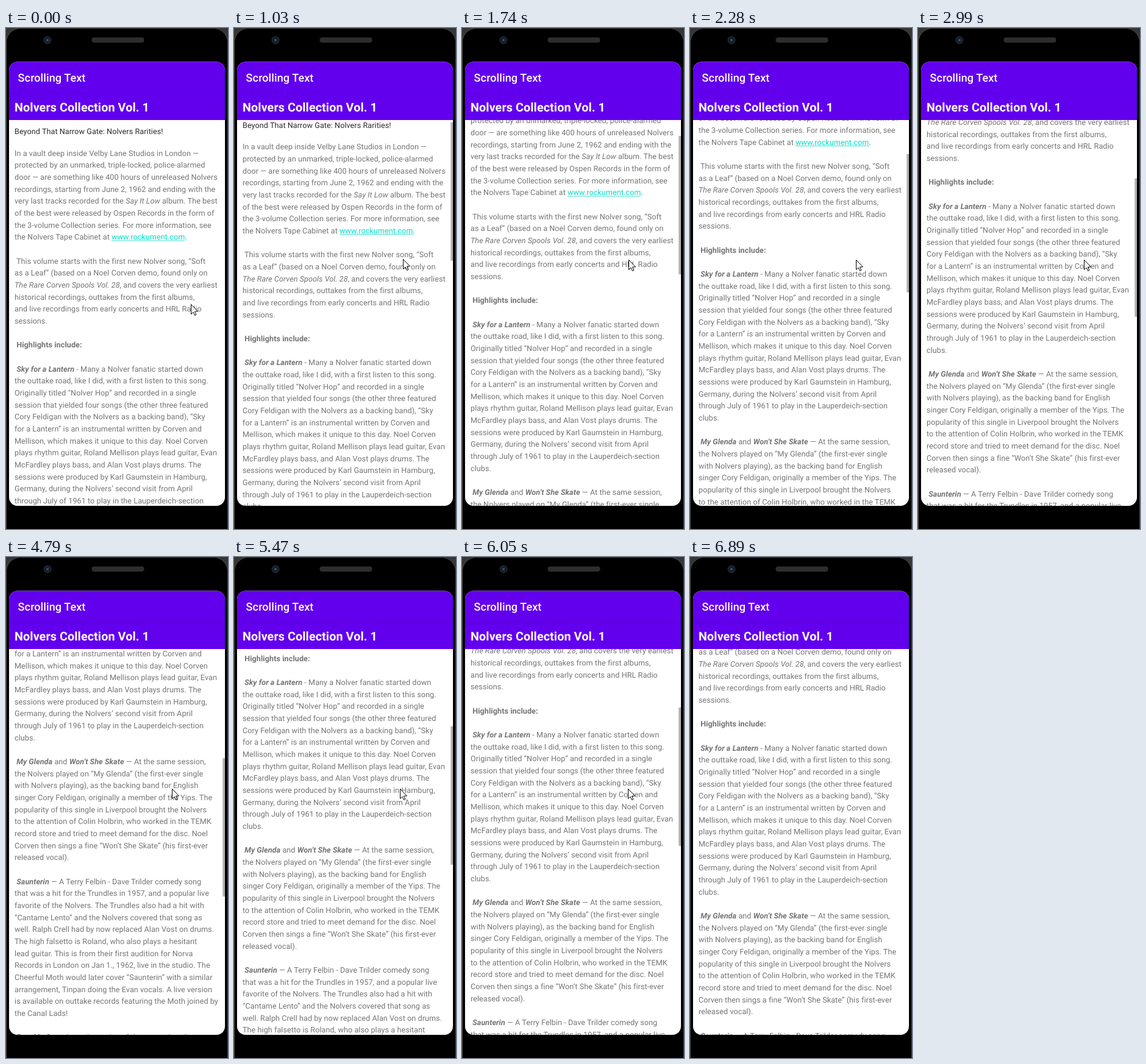
Recreate the animation shown at these times as an HTML page with a canvas. Size 364 px wide and 822 px high, loop 7.6 s.

```html
<!DOCTYPE html>
<html lang="en">
<head>
<meta charset="utf-8">
<title>Scrolling Text</title>
<style>
html, body { margin: 0; width: 100%; height: 100%; overflow: hidden; background: #000; }
canvas { display: block; width: 364px; height: 822px; }
</style>
</head>
<body>
<canvas id="stage"></canvas>
<script>
const W = 364, H = 822, LOOP = 7600;
const TICK = 137, LEAD = 45;
const VIEW = { x: 5, top: 151, right: 359, bottom: 784 };
const PITCH = 19.667, FIRST = 209.6, CONTENT = 1765;
const FAMILY = 'Roboto, "Liberation Sans", sans-serif';

// Marks: ^bold^  *bold italic*  _italic_  ~link~
const article = `In a vault deep inside Velby Lane Studios in London —
protected by an unmarked, triple-locked, police-alarmed
door — are something like 400 hours of unreleased Nolvers
recordings, starting from June 2, 1962 and ending with the
very last tracks recorded for the _Say It Low_ album. The best
of the best were released by Ospen Records in the form of
the 3-volume Collection series. For more information, see
the Nolvers Tape Cabinet at ~www.rockument.com~.

 This volume starts with the first new Nolver song, “Soft
as a Leaf” (based on a Noel Corven demo, found only on
_The Rare Corven Spools Vol. 28_, and covers the very earliest
historical recordings, outtakes from the first albums,
and live recordings from early concerts and HRL Radio
sessions.

 ^Highlights include:^

 *Sky for a Lantern* - Many a Nolver fanatic started down
the outtake road, like I did, with a first listen to this song.
Originally titled “Nolver Hop” and recorded in a single
session that yielded four songs (the other three featured
Cory Feldigan with the Nolvers as a backing band), “Sky
for a Lantern” is an instrumental written by Corven and
Mellison, which makes it unique to this day. Noel Corven
plays rhythm guitar, Roland Mellison plays lead guitar, Evan
McFardley plays bass, and Alan Vost plays drums. The
sessions were produced by Karl Gaumstein in Hamburg,
Germany, during the Nolvers’ second visit from April
through July of 1961 to play in the Lauperdeich-section
clubs.

 *My Glenda* and *Won’t She Skate* — At the same session,
the Nolvers played on “My Glenda” (the first-ever single
with Nolvers playing), as the backing band for English
singer Cory Feldigan, originally a member of the Yips. The
popularity of this single in Liverpool brought the Nolvers
to the attention of Colin Holbrin, who worked in the TEMK
record store and tried to meet demand for the disc. Noel
Corven then sings a fine “Won’t She Skate” (his first-ever
released vocal).

 *Saunterin* — A Terry Felbin - Dave Trilder comedy song
that was a hit for the Trundles in 1957, and a popular live
favorite of the Nolvers. The Trundles also had a hit with
“Cantame Lento” and the Nolvers covered that song as
well. Ralph Crell had by now replaced Alan Vost on drums.
The high falsetto is Roland, who also plays a hesitant
lead guitar. This is from their first audition for Norva
Records in London on Jan 1., 1962, live in the studio. The
Cheerful Moth would later cover “Saunterin” with a similar
arrangement, Tinpan doing the Evan vocals. A live version
is available on outtake records featuring the Moth joined by
the Canal Lads!

 *Row Me On* — An early version of the song, played a
bit slower and with more of a blues feeling, and a cool
bossa-nova beat in middle. Evan had to sing while Noel
played harmonica — a first for the group. Alan Vost played
drums on this version.

 *She Hums Low – Ere Noon Was Due – Swirl and Stomp* —
Live at the Duchess Nerys Theatre by Tollinger Square in
London, attended by the Queen. “Ere Noon Was Due” (by
Rosalind Farnby) is from the musical The Barley King and
a hit for Patsy Roe in 1961. Before playing it, Evan said
it was recorded by his favorite American group, “Bessie
Holker” (which got some laughs). At the end, Noel tells the
people in the cheaper seats to clap their hands, and the`.split('\n');

// Key points [tick, value], joined by straight lines
const scrollPath = [
  [6, 0], [13, 73], [19, 238], [21, 238], [22, 267], [29, 766],
  [31, 766], [35, 499], [40, 353.5], [45, 246]
];
const cursorX = [[0, 303], [2, 280], [13, 272.5], [48, 272], [49, 227]];
const cursorY = [[0, 453], [2, 378], [13, 380], [46, 380], [49, 801]];
const barFade = [[6, 0], [7, 1], [46, 1], [49, 0]];
const CURSOR_GONE = 50;

const styles = { '^': 'bold', '*': 'italic bold', '_': 'italic', '~': '' };
const canvas = document.getElementById('stage');
const ctx = canvas.getContext('2d');
const ratio = window.devicePixelRatio || 1;
canvas.width = W * ratio;
canvas.height = H * ratio;

function along(path, t) {
  const next = path.findIndex(key => key[0] > t);
  if (next === 0) return path[0][1];
  if (next < 0) return path[path.length - 1][1];
  const [t0, v0] = path[next - 1], [t1, v1] = path[next];
  return v0 + (v1 - v0) * (t - t0) / (t1 - t0);
}

function box(x, y, w, h, r) {
  ctx.beginPath();
  ctx.roundRect(x, y, w, h, r);
}

function disc(x, y, r, color) {
  ctx.fillStyle = color;
  ctx.beginPath();
  ctx.arc(x, y, r, 0, Math.PI * 2);
  ctx.fill();
}

function label(text, x, y, size, weight, color) {
  ctx.font = `${weight} ${size}px ${FAMILY}`;
  ctx.fillStyle = color;
  ctx.fillText(text, x, y);
  return ctx.measureText(text).width;
}

function richLine(line, x, y) {
  let mark = '';
  for (const part of line.split(/([\^*_~])/)) {
    if (part in styles) {
      mark = mark ? '' : part;
    } else if (part) {
      const link = mark === '~';
      const width = label(part, x, y, 12.62, styles[mark] || '', link ? '#03dac5' : '#757575');
      if (link) ctx.fillRect(x, y + 1.3, width, 0.8);
      x += width;
    }
  }
}

function drawPhone() {
  ctx.fillStyle = '#363636';
  ctx.fillRect(0, 0, W, H);
  box(0.5, 0.5, W - 1, H + 60, 23);
  ctx.fillStyle = '#000';
  ctx.fill();
  ctx.strokeStyle = '#4c4c4c';
  ctx.lineWidth = 1;
  ctx.stroke();
  disc(68, 20, 6.5, '#23262b');
  disc(68, 20, 4.5, '#121a26');
  disc(68, 20, 2.2, '#32486a');
  box(140.5, 15.5, 86, 8.5, 4);
  ctx.fillStyle = '#2d2d2d';
  ctx.fill();
}

function drawArticle(scroll, barAlpha) {
  ctx.save();
  ctx.beginPath();
  ctx.rect(VIEW.x, VIEW.top, VIEW.right - VIEW.x, VIEW.bottom - VIEW.top);
  ctx.clip();
  label('Beyond That Narrow Gate: Nolvers Rarities!', 14, 174.2 - scroll, 12.62, '', '#2b2b2b');
  article.forEach((line, i) => {
    const y = FIRST + i * PITCH - scroll;
    if (y > VIEW.top - 10 && y < VIEW.bottom + 15) richLine(line, 14, y);
  });
  const share = (VIEW.bottom - VIEW.top) / CONTENT;
  ctx.globalAlpha = barAlpha;
  ctx.fillStyle = '#b0b0b0';
  ctx.fillRect(355.3, VIEW.top + scroll * share, 3.7, (VIEW.bottom - VIEW.top) * share);
  ctx.restore();
}

function drawScreen(scroll, barAlpha) {
  ctx.save();
  box(VIEW.x, 55.5, VIEW.right - VIEW.x, VIEW.bottom - 55.5, 14);
  ctx.clip();
  ctx.fillStyle = '#fff';
  ctx.fillRect(0, 0, W, H);
  drawArticle(scroll, barAlpha);
  ctx.fillStyle = '#6200ee';
  ctx.fillRect(0, 50, W, VIEW.top - 50);
  ctx.fillStyle = '#5a00dc';
  ctx.fillRect(0, 107, W, 1);
  label('Scrolling Text', 19.6, 88.3, 18.1, '500', '#fff');
  label('Nolvers Collection Vol. 1', 14, 136.6, 19.83, 'bold', '#fff');
  ctx.restore();
}

function drawCursor(x, y) {
  const arrow = [[0, 0], [0, 16], [3.6, 12.7], [6, 18], [8.4, 17], [6, 11.7], [11, 11.5]];
  ctx.beginPath();
  for (const [dx, dy] of arrow) ctx.lineTo(x + dx + 0.5, y + dy + 0.5);
  ctx.closePath();
  ctx.fillStyle = '#fff';
  ctx.fill();
  ctx.strokeStyle = '#000';
  ctx.lineWidth = 1;
  ctx.stroke();
}

function draw(ms) {
  const t = Math.floor((ms + LEAD) / TICK);
  ctx.setTransform(ratio, 0, 0, ratio, 0, 0);
  ctx.textRendering = 'geometricPrecision';
  ctx.letterSpacing = '0.06px';
  drawPhone();
  drawScreen(along(scrollPath, t), along(barFade, t));
  if (t < CURSOR_GONE) drawCursor(Math.round(along(cursorX, t)), Math.round(along(cursorY, t)));
}

const start = performance.now();
function tick() {
  draw((performance.now() - start) % LOOP);
  requestAnimationFrame(tick);
}
tick();
</script>
</body>
</html>
```
